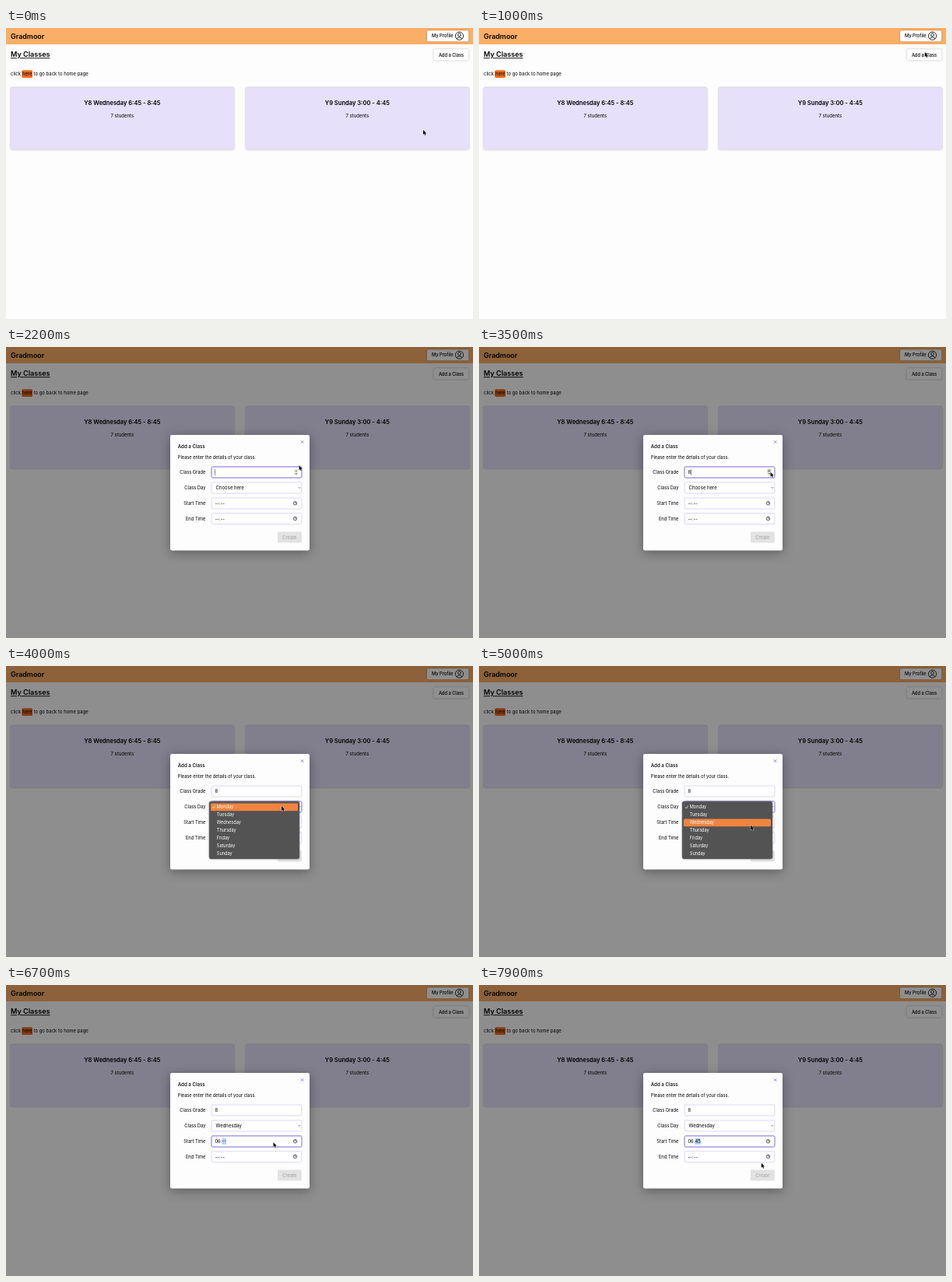
These frames come from a looping animation (600x374 px, 8 s). An HTML page:

```html
<!DOCTYPE html>
<html lang="en">
<head>
<meta charset="utf-8">
<title>My Classes</title>
<style>
html, body { margin: 0; width: 100%; height: 100%; overflow: hidden; background: #fdfdfd; }
svg { display: block; width: 600px; height: 374px; font-family: Inter, Roboto, sans-serif; }
text { white-space: pre; }
.raised { filter: drop-shadow(0 .6px 1px rgba(0,0,0,.3)); }
.dialog { filter: drop-shadow(0 3px 7px rgba(0,0,0,.35)); }
</style>
</head>
<body>
<svg id="stage" viewBox="0 0 600 374"></svg>
<script>
const LOOP = 8000, STEP = 100;
const DAYS = ['Monday', 'Tuesday', 'Wednesday', 'Thursday', 'Friday', 'Saturday', 'Sunday'];
const ROWS = [161, 181, 201, 220.7];

const rect = (x, y, w, h, fill, rx = 0, extra = '') =>
  `<rect x="${x}" y="${y}" width="${w}" height="${h}" rx="${rx}" fill="${fill}" ${extra}/>`;
// y is the middle of the capitals
const text = (x, y, size, str, extra = '') =>
  `<text x="${x}" y="${y + size * 0.363}" font-size="${size}" ${extra}>${str}</text>`;
const line = (d, width, color = '#111', extra = '') =>
  `<path d="${d}" fill="none" stroke="${color}" stroke-width="${width}" stroke-linecap="round" stroke-linejoin="round" ${extra}/>`;
const MID = 'text-anchor="middle" ', END = 'text-anchor="end" ';
const bold = 'font-weight="600" ', medium = 'font-weight="500" ';

const card = (x, title) =>
  rect(x, 76.5, 287, 79.7, '#e6e0fa', 1.8, 'class="raised"') +
  text(x + 143.3, 96.7, 7.55, title, MID + bold) +
  text(x + 143.3, 113.3, 6, '7 students', MID);

const page = () =>
  rect(0, 0, 600, 374, '#fdfdfd') +
  rect(0, 0, 600, 21, '#fbae67') +
  text(6, 10.5, 8.95, 'Gradmoor', bold) +
  rect(541, 3.2, 53.2, 14, '#fff', 1.5, 'class="raised"') +
  text(547, 10.3, 5.72, 'My Profile', medium) +
  '<g fill="none" stroke="#111" stroke-width=".9"><circle cx="582.5" cy="10.2" r="5.1"/>' +
  '<circle cx="582.5" cy="8.8" r="1.9"/><path d="M579.2 14Q579.6 11.9 582.5 11.9T585.8 14"/></g>' +
  text(6, 34, 9.05, 'My Classes', bold + 'text-decoration="underline"') +
  rect(549.5, 27.2, 45, 14.4, '#fff', 1.5, 'class="raised"') +
  text(572, 34.5, 5.7, 'Add a Class', MID + medium) +
  text(6, 59, 5.95, 'click') +
  rect(20.4, 54.2, 13.6, 9.7, '#f0681e', 1.5) +
  text(27.2, 59, 5.8, 'here', MID) +
  text(35.5, 59, 5.98, 'to go back to home page') +
  card(6, 'Y8 Wednesday 6:45 - 8:45') +
  card(308, 'Y9 Sunday 3:00 - 4:45');

const field = (y, i) =>
  text(256.4, y, 5.75, ['Class Grade', 'Class Day', 'Start Time', 'End Time'][i], END) +
  rect(264.2, y - 7, 115.6, 14, '#fff', 1.5, 'stroke="#c6bfe6" stroke-width=".6"');

const clock = y =>
  `<circle cx="371.5" cy="${y}" r="2.2" fill="none" stroke="#111" stroke-width=".7"/>` +
  line(`M371.5 ${y - 1.2}V${y}H372.5`, 0.5);

const dialog = () =>
  rect(0, 0, 600, 374, '#000', 0, 'opacity=".44"') +
  rect(211, 113, 179, 148.5, '#fdfdfd', 2.2, 'class="dialog"') +
  text(220.8, 128, 6.15, 'Add a Class', medium) +
  text(220.8, 141.6, 5.68, 'Please enter the details of your class.') +
  line('M379.2 120.6l2.8 2.8m0-2.8l-2.8 2.8', 0.65, '#5746af') +
  ROWS.map(field).join('') +
  rect(264, 0, 116, 14.2, 'none', 1.6, 'id="ring" stroke="#8f7be0" stroke-width="1"') +
  text(268.4, 161.2, 5.9, '', 'id="grade"') +
  rect(0, 157.2, 0.5, 7.6, '#111', 0, 'id="caret"') +
  `<g id="spinner">${rect(370.5, 157, 4.7, 8, '#e4e4e4', 1.4)}` +
  rect(370.5, 157, 4.7, 4, '#bdbdbd', 1.2, 'id="press"') +
  line('M371.9 159.8l.95-1.1.95 1.1M371.9 162.3l.95 1.1.95-1.1', 0.6, '#333') + '</g>' +
  text(269.6, 181.1, 6, '', 'id="day"') +
  line('M375.8 180.4l1.1 1.1 1.1-1.1', 0.6, '#333') +
  rect(0, 197, 0, 8, '#b0d2fb', 0, 'id="mark"') +
  text(268.4, 201, 5.9, '--:--', 'id="start"') + clock(200.8) +
  text(268.4, 220.7, 5.9, '--:--') + clock(220.5) +
  rect(349, 237.6, 30.8, 13.8, '#e2e2e2', 1.3) +
  text(364.4, 244.5, 5.75, 'Create', MID + 'fill="#a2a2a2"');

const menu = () =>
  rect(261, 174, 116, 74, '#535353', 2.4, 'class="raised" stroke="#777" stroke-width=".4"') +
  rect(263, 0, 112, 9.8, '#f08440', 1.4, 'id="hover"') +
  DAYS.map((d, i) => text(270.8, 181.4 + 10 * i, 5.6, d, 'fill="#fff"')).join('') +
  line('M265.4 181.6l1.1 1.4 2-3.2', 0.7, '#fff');

const stage = document.getElementById('stage');
stage.innerHTML = page() +
  `<g id="dialog">${dialog()}</g><g id="menu">${menu()}</g>` +
  '<path id="cursor" d="M0 0V6L1.4 4.8 2.3 6.9 3.3 6.5 2.4 4.5H4.3Z" fill="#000" stroke="#fff" stroke-width=".7" paint-order="stroke"/>';

const $ = id => document.getElementById(id);
const set = (id, attrs) => { for (const k in attrs) $(id).setAttribute(k, attrs[k]); };
const show = (id, on) => set(id, { visibility: on ? 'visible' : 'hidden' });

// time, x, y of the pointer tip
const PATH = [
  [0, 536, 131], [600, 573, 35], [800, 573, 35], [900, 572.5, 30.5], [1100, 573, 31.5],
  [1700, 380, 140], [2600, 374, 161], [2700, 374.5, 159], [3400, 374.5, 159],
  [3500, 374.5, 160.8], [4000, 354, 180], [4200, 354, 180], [4800, 350, 214],
  [4900, 350, 214], [5000, 349, 204.8], [5300, 346, 203.5], [6600, 346, 203],
  [6700, 343.5, 202.2], [6900, 320, 203.5], [7400, 320, 203.5], [7900, 362.8, 228.8]
];

function pointer(t) {
  const i = PATH.findIndex(p => p[0] > t);
  if (i < 0) return PATH[PATH.length - 1].slice(1);
  const [t0, x0, y0] = PATH[i - 1], [t1, x1, y1] = PATH[i];
  const u = (t - t0) / (t1 - t0), e = u * u * (3 - 2 * u);
  return [x0 + (x1 - x0) * e, y0 + (y1 - y0) * e];
}

// latest value whose time has come
const at = (t, steps) => steps.reduce((v, [when, next]) => t >= when ? next : v, '');

function draw(t) {
  const [x, y] = pointer(t);
  set('cursor', { transform: `translate(${x} ${y})` });

  const open = t >= 1100;
  set('dialog', { display: open ? 'inline' : 'none' });
  if (!open) return set('menu', { display: 'none' });

  const focus = t < 4000 ? 0 : t < 6300 ? 1 : 2;
  set('ring', { y: ROWS[focus] - 7.1 });

  const grade = at(t, [[2900, '1'], [3000, '2'], [3100, '4'], [3200, '6'], [3300, '8']]);
  $('grade').textContent = grade;
  set('caret', { x: 268.4 + (grade ? $('grade').getComputedTextLength() + 0.2 : 0) });
  show('caret', focus === 0);
  show('spinner', focus === 0);
  set('press', { opacity: t >= 2900 && t < 3600 ? 1 : 0 });

  $('day').textContent = at(t, [[0, 'Choose here'], [5400, 'Wednesday']]);
  const fade = Math.max(0, Math.min(1, (5700 - t) / 300));
  set('menu', { display: t >= 4000 && fade ? 'inline' : 'none', opacity: fade });
  const row = Math.max(0, Math.min(6, Math.floor((y - 176.4) / 10)));
  set('hover', { y: 176.5 + 10 * row });

  const start = $('start');
  start.textContent = at(t, [[0, '--:--'], [6500, '06:--'], [7300, '06:04'], [7500, '06:45']]);
  const from = t < 6500 ? 0 : 3;
  set('mark', {
    x: 268.4 + (from ? start.getSubStringLength(0, from) : 0),
    width: start.getSubStringLength(from, 2)
  });
  show('mark', focus === 2);
}

function tick() {
  const t = performance.now() % LOOP;
  draw(Math.floor(t / STEP) * STEP);
  requestAnimationFrame(tick);
}
tick();
</script>
</body>
</html>
```
